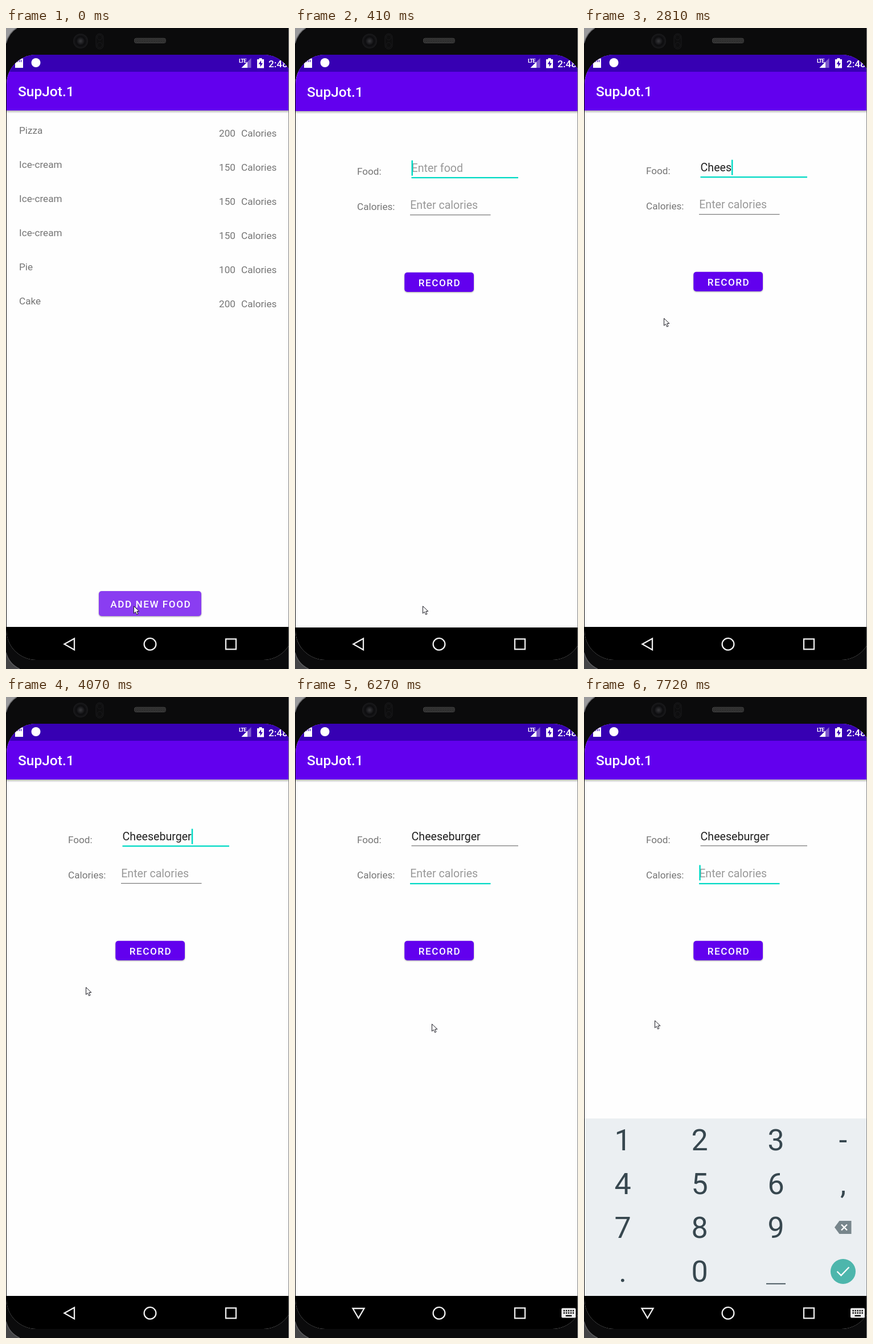
Animation, 497 px wide and 1127 px high, one loop 8000 ms. Source, as an HTML page:

```html
<!DOCTYPE html>
<html lang="en">
<head>
<meta charset="utf-8">
<title>Food log</title>
<style>
  html, body { margin: 0; width: 100%; height: 100%; overflow: hidden; background: #0b0b0c; }
  svg { display: block; width: 100vw; height: 100vh; }
  text { font-family: Roboto, "Noto Sans", sans-serif; font-size: 17.15px; white-space: pre; }
  .muted { fill: #757575; }
  .field { font-size: 19.6px; }
  .title { font-size: 24.5px; font-weight: 500; fill: #fff; }
  .btn { font-weight: 500; fill: #fff; letter-spacing: 1.53px; }
  .raised { filter: drop-shadow(0 1.6px 1.2px rgba(0, 0, 0, .36)); }
  .key { font-size: 52px; fill: #37474f; text-anchor: middle; }
  .line { fill: none; stroke: #eee; stroke-width: 2.3; }
</style>
</head>
<body>
<svg viewBox="0 0 497 1127" preserveAspectRatio="none">
  <defs>
    <clipPath id="screen"><rect x="1" y="47" width="503" height="1064" rx="52"/></clipPath>
    <clipPath id="reveal"><rect id="revealBox" x="0" y="47" width="504" height="1064"/></clipPath>
    <linearGradient id="fade" x2="0" y2="1">
      <stop offset="0" stop-color="#000" stop-opacity=".3"/>
      <stop offset="1" stop-color="#000" stop-opacity="0"/>
    </linearGradient>
    <radialGradient id="lens">
      <stop offset="0" stop-color="#38383b"/>
      <stop offset=".35" stop-color="#1e1e21"/>
      <stop offset=".6" stop-color="#0c0c0e"/>
      <stop offset="1" stop-color="#1b1b1d"/>
    </radialGradient>
    <pattern id="mesh" width="3" height="3" patternUnits="userSpaceOnUse">
      <rect width="3" height="3" fill="#454545"/>
      <path d="M0 0L3 3M3 0L0 3" stroke="#191919" stroke-width=".8"/>
    </pattern>
    <g id="frame">
      <rect y="47" width="504" height="1064" fill="#fefefe"/>
      <rect y="145" width="504" height="5" fill="url(#fade)"/>
      <rect y="47" width="504" height="98" fill="#6200ee"/>
      <text class="title" x="21" y="120">SupJot.1</text>
      <rect y="1053" width="504" height="60" fill="#000"/>
    </g>
  </defs>

  <rect width="497" height="1127" fill="#0b0b0c"/>
  <path d="M0 0H19Q5 8 0 27Z" fill="#9a9a9c"/>
  <path d="M19 0Q5 8 0 27" fill="none" stroke="#6c6c6e" stroke-width="1.5"/>
  <path d="M0 1098Q5 1118 24 1127H0Z" fill="#444446"/>
  <path d="M0 1098Q5 1118 24 1127" fill="none" stroke="#5c5c5e" stroke-width="1.5"/>
  <circle cx="131" cy="23" r="13" fill="url(#lens)"/>
  <g fill="#0e0e0f" stroke="#1b1b1d">
    <rect x="158" y="10" width="13" height="27" rx="6.5"/>
    <circle cx="164.5" cy="16.5" r="4.5"/>
    <circle cx="164.5" cy="30" r="4.5"/>
  </g>
  <rect x="225.5" y="18" width="55" height="8.5" rx="3" fill="url(#mesh)" stroke="#3a3a3a"/>

  <g clip-path="url(#screen)">
    <g id="list">
      <use href="#frame"/>
      <g id="rows"></g>
      <rect class="raised" x="163" y="990" width="180" height="44" rx="5" fill="#8a3df1"/>
      <text class="btn" x="183.3" y="1018.6">ADD NEW FOOD</text>
    </g>

    <g id="form"><g clip-path="url(#reveal)">
      <use href="#frame"/>
      <text class="muted" x="109" y="257">Food:</text>
      <text class="muted" x="109" y="319">Calories:</text>
      <text id="food" class="field" x="204.6" y="252"></text>
      <text class="field" x="202.2" y="317" fill="#999">Enter calories</text>
      <rect id="foodLine" x="204.5" y="261" width="187.5"/>
      <rect id="calLine" x="202" y="327" width="141.5"/>
      <rect id="caret" width="2.5" height="27" fill="#03dac5"/>
      <rect class="raised" x="192.3" y="428.7" width="121.7" height="34.3" rx="5" fill="#6200ee"/>
      <text class="btn" x="216.8" y="452.7">RECORD</text>
    </g></g>

    <g id="keyboard">
      <rect y="741" width="504" height="312" fill="#ebeff2"/>
      <g id="keys"></g>
      <path d="M320 1031.7H354" stroke="#37474f" stroke-width="1.7"/>
      <path d="M440 932.5L448.5 921H469.5V944H448.5Z" fill="#78868c"/>
      <path d="M452 927.5L462 937.5M462 927.5L452 937.5" stroke="#fff" stroke-width="2.4"/>
      <circle cx="455" cy="1010" r="22" fill="#4db6ac"/>
      <path d="M444.5 1010L451.5 1017L465.5 1002.5" fill="none" stroke="#fff" stroke-width="2.4"/>
    </g>

    <rect y="47" width="504" height="30" fill="#3700b3"/>
    <g fill="#fff">
      <path d="M21 53.5H30V70H16V58.5Z"/>
      <path d="M20.5 56V60M23.5 56V60M26.5 56V60" stroke="#3700b3" stroke-width="1.2"/>
      <circle cx="52.5" cy="61" r="8"/>
      <text x="409" y="61" style="font-size:9.5px;font-weight:700;letter-spacing:-.9px">LTE</text>
      <path d="M430.5 53V70H413.5Z" opacity=".35"/>
      <path d="M424 59.5V70H413.5Z"/>
      <path d="M441 55H444.5V53H449.5V55H453V70.5H441Z"/>
      <path d="M448 57L443.5 63.5H446.5V68.5L451 61.8H448Z" fill="#3700b3"/>
      <text x="461" y="68.5" style="font-weight:500">2:48</text>
    </g>
    <path id="back" class="line"/>
    <circle class="line" cx="253" cy="1083.3" r="10.4"/>
    <rect class="line" x="386" y="1074.3" width="18" height="18"/>
    <g id="switcher">
      <rect x="468" y="1074.5" width="25" height="17" rx="2" fill="#eee"/>
      <path d="M471.5 1079H490M471.5 1083H490" stroke="#000" stroke-width="2.3" stroke-dasharray="2.3 1.7"/>
      <path d="M475.5 1087.8H486" stroke="#000" stroke-width="2.2"/>
    </g>
  </g>
  <rect x="496" width="1" height="1127" fill="#858585"/>
  <path id="cursor" d="M.5 .5V13.2L3.5 10.5L5.6 15.3L7.9 14.3L5.8 9.6H10Z" fill="#fff" stroke="#1c1c24" stroke-width="1" stroke-linejoin="round"/>
</svg>
<script>
const LOOP = 8000, TOP = 47, HEIGHT = 1064, TEAL = '#03dac5';
const $ = id => document.getElementById(id);
const set = (el, attrs) => { for (const k in attrs) el.setAttribute(k, attrs[k]); };
const show = (el, on) => set(el, { visibility: on ? 'visible' : 'hidden' });
const label = (parent, cls, x, y, str) => {
  const el = document.createElementNS('http://www.w3.org/2000/svg', 'text');
  set(el, { class: cls, x, y });
  el.textContent = str;
  parent.append(el);
};

[['Pizza', 200], ['Ice-cream', 150], ['Ice-cream', 150], ['Ice-cream', 150], ['Pie', 100], ['Cake', 200]]
  .forEach(([name, kcal], i) => {
    label($('rows'), 'muted', 23, 185.6 + 60 * i, name);
    label($('rows'), 'muted', 374, 190.5 + 60 * i, kcal);
    label($('rows'), 'muted', 413, 190.5 + 60 * i, 'Calories');
  });

['123-', '456,', '789', '.0'].forEach((row, r) =>
  [...row].forEach((ch, c) =>
    label($('keys'), 'key', [68, 203, 337, 455][c], 796.8 + 77 * r, ch)));

// Each entry starts with its time; the last one reached holds.
const at = (steps, t) => steps.filter(s => s[0] <= t).pop();

const pointer = [
  [0, 224, 1016], [900, 222, 954], [1040, 285, 520], [1170, 327, 122], [1290, 225, 330],
  [1420, 140, 510], [4580, 126, 545], [4730, 110, 588], [4850, 190, 470], [4970, 282, 314],
  [5120, 296, 305], [5240, 310, 297], [5820, 271, 365], [5970, 240, 574.5],
  [7030, 180, 572], [7150, 124, 568.5]
];
const opening = [[0, 0], [270, .38], [410, .977], [530, 1]];
const typed = [
  [0, 0], [2370, 1], [2510, 3], [2660, 4], [2810, 5], [2970, 6], [3530, 7],
  [3670, 8], [3790, 9], [3940, 11], [4070, 12]
];
const blink = [
  [0, 1], [780, 0], [1170, 1], [1700, 0], [2220, 1], [4580, 0], [5120, 1],
  [6270, 0], [6630, 1], [7150, 0], [7720, 1]
];
const rise = [[0, 0, 0], [6390, 2, .95], [6510, .5, .99], [6630, 0, 1]];

// Letter advances in em.
const widths = { C: .651, h: .551, e: .53, s: .516, b: .561, u: .551, r: .338, g: .561 };

function draw(t) {
  const p = at(opening, t)[1];
  show($('form'), p > 0);
  show($('list'), p < 1);
  set($('list'), { transform: `translate(0 ${-.02 * HEIGHT * p})` });
  set($('form'), { transform: `translate(0 ${.041 * HEIGHT * (1 - p)})` });
  const hidden = .959 * HEIGHT * (1 - p);
  set($('revealBox'), { y: TOP + hidden, height: HEIGHT - hidden });

  const onCalories = t >= 5550;
  const word = 'Cheeseburger'.slice(0, at(typed, t)[1]);
  $('food').textContent = word || 'Enter food';
  set($('food'), { fill: word ? '#202020' : '#999' });
  const underline = (el, on) => set(el, { fill: on ? TEAL : '#777', height: on ? 2.3 : 1.2 });
  underline($('foodLine'), !onCalories);
  underline($('calLine'), onCalories);

  const width = [...word].reduce((sum, ch) => sum + widths[ch] * 19.6, 0);
  set($('caret'), onCalories ? { x: 202.3, y: 295.5 } : { x: 204.5 + width, y: 231.7 });
  set($('caret'), { opacity: at(blink, t)[1] });

  const [, drop, alpha] = at(rise, t);
  show($('keyboard'), alpha > 0);
  set($('keyboard'), { transform: `translate(0 ${drop})`, opacity: alpha });
  const typing = t >= 6120;
  show($('switcher'), typing);
  set($('back'), { d: typing ? 'M101.5 1075H121.5L111.5 1092Z' : 'M102.5 1083.3L120 1073.5V1093.2Z' });

  const [, x, y] = at(pointer, t);
  set($('cursor'), { transform: `translate(${x} ${y})` });
}

const start = performance.now();
function tick() {
  draw((performance.now() - start) % LOOP);
  requestAnimationFrame(tick);
}
tick();
</script>
</body>
</html>
```
